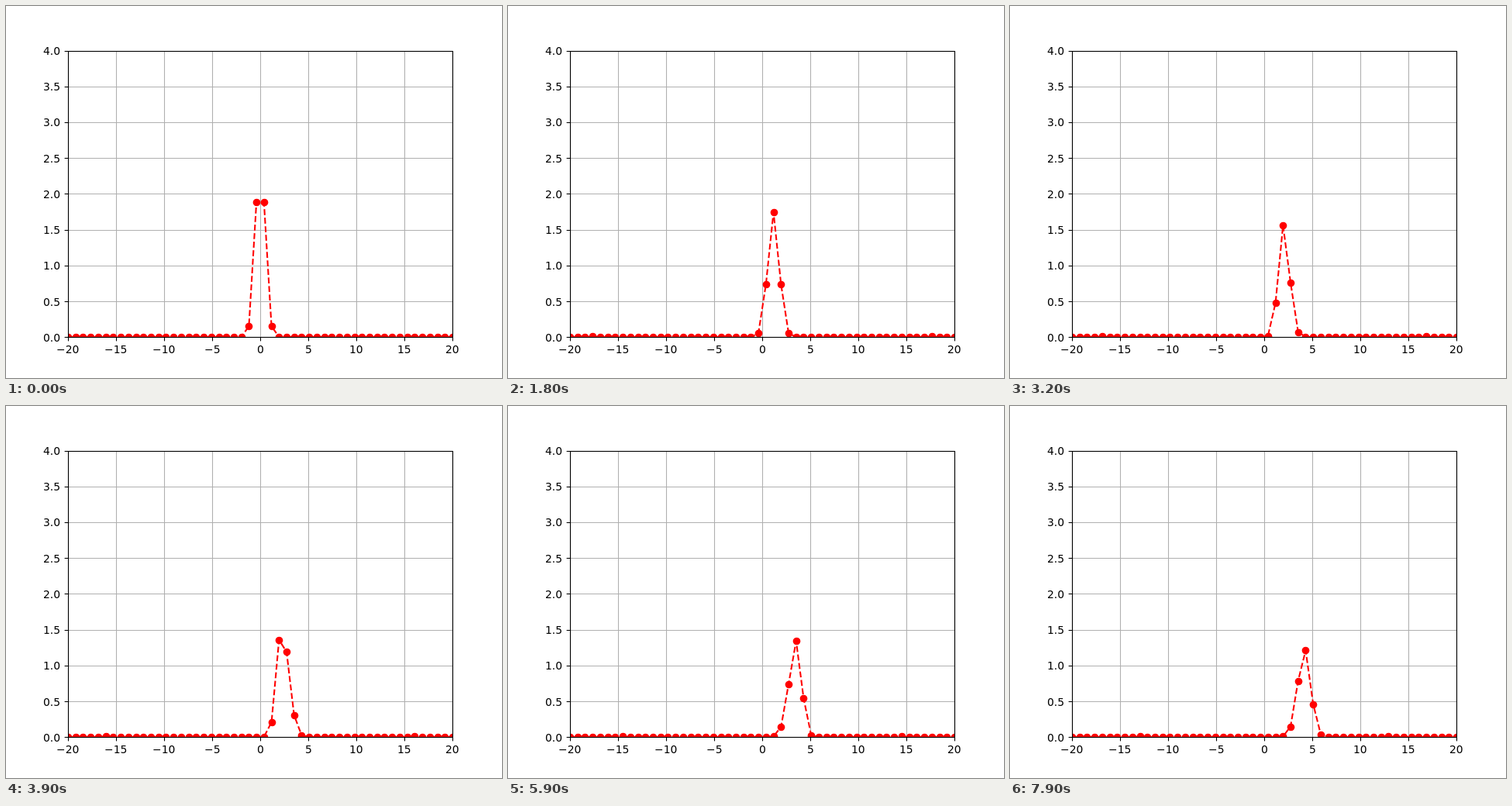
Animation of 640x480 px, one loop 8000 ms. Source, as an HTML page:

```html
<!DOCTYPE html>
<html lang="en">
<head>
<meta charset="utf-8">
<title>Moving pulse</title>
<style>
  html, body { margin: 0; width: 100%; height: 100%; overflow: hidden; background: #fff; }
  svg { display: block; }
  text { font: 13.89px "DejaVu Sans", sans-serif; }
  .grid { stroke: #b0b0b0; stroke-width: 1.11; }
  .tick { stroke: #000; stroke-width: 1.11; }
  .frame { fill: none; stroke: #000; stroke-width: 1.11; }
  #wave { fill: none; stroke: #f00; stroke-width: 2.08; stroke-dasharray: 7.71 3.33; stroke-linejoin: round; }
  circle { fill: #f00; }
</style>
</head>
<body>
<svg width="640" height="480" viewBox="0 0 640 480">
  <clipPath id="area"><rect x="80" y="58" width="496" height="369.5"/></clipPath>
  <g id="axes"></g>
  <g id="plot" clip-path="url(#area)"><polyline id="wave"/></g>
  <rect class="frame" x="80.5" y="58.5" width="496" height="369"/>
</svg>
<script>
const LOOP = 8000, STEP = 100, COUNT = 52;
const LEFT = 80, WIDTH = 496, BASE = 427.2, UNIT = 92.4;

const axes = document.getElementById('axes');
const plot = document.getElementById('plot');
const wave = document.getElementById('wave');
const snap = v => Math.floor(v + 0.5);

function add(parent, tag, attrs) {
  const el = document.createElementNS('http://www.w3.org/2000/svg', tag);
  for (const key in attrs) el.setAttribute(key, attrs[key]);
  return parent.appendChild(el);
}

const line = (cls, x1, y1, x2, y2) => add(axes, 'line', { class: cls, x1, y1, x2, y2 });

// Places text on whole pixels; align is the share of its width left of x
function label(text, x, y, align) {
  const el = add(axes, 'text', { y: snap(y) });
  el.textContent = text;
  el.setAttribute('x', snap(x - el.getComputedTextLength() * align));
}

for (let i = 0; i <= 8; i++) {
  const x = LEFT + 62 * i, px = x + 0.5;
  const y = BASE - 46.2 * i, py = snap(y) + 0.5;
  line('grid', px, 58, px, BASE);
  line('grid', LEFT, py, LEFT + WIDTH, py);
  line('tick', px, 427.5, px, 432.4);
  line('tick', 75.6, py, 80.5, py);
  label(String(i * 5 - 20).replace('-', '\u2212'), x, 448, 0.5);
  label((i / 2).toFixed(1), 70.28, y + 5.5, 1);
}

// Key points of the pulse: step, centre, height, steepness of left and right flank
const keys = [
  [0, 0, 2.58, 2.05, 2.05],
  [18, 1.175, 1.745, 1.4, 1.4],
  [26, 1.82, 1.59, 1.65, 1.65],
  [39, 2.223, 1.54, 1.83, 0.95],
  [44, 2.72, 1.83, 1.2, 1.3],
  [51, 3.32, 1.135, 0.636, 1.745],
  [67, 3.845, 1.555, 1.07, 1.68],
  [79, 4.2, 1.23, 1, 1.22]
];

function pulseAt(step) {
  const n = Math.max(1, keys.findIndex(k => k[0] >= step));
  const a = keys[n - 1], b = keys[n];
  const p = (step - a[0]) / (b[0] - a[0]);
  return a.map((v, i) => v + (b[i] - v) * p);
}

function heights(step) {
  const [, centre, top, left, right] = pulseAt(step);
  const h = Array.from({ length: COUNT }, (_, i) => {
    const d = 40 * i / (COUNT - 1) - 20 - centre;
    return top * Math.exp(-(d < 0 ? left : right) * d * d);
  });
  // A faint mirrored ripple drifts inwards from both ends
  const edge = Math.floor(1 + step / 9);
  if (step > 0) h[edge] = h[COUNT - 1 - edge] = 0.011;
  return h;
}

const xs = Array.from({ length: COUNT }, (_, i) => LEFT + WIDTH * i / (COUNT - 1));
const dots = xs.map(x => add(plot, 'circle', { cx: snap(x) + 0.5, r: 4.86 }));
let shown = -1;

function draw() {
  const step = Math.floor(performance.now() % LOOP / STEP);
  if (step !== shown) {
    shown = step;
    const ys = heights(step).map(h => BASE - h * UNIT);
    wave.setAttribute('points', xs.map((x, i) => x.toFixed(2) + ',' + ys[i].toFixed(2)).join(' '));
    dots.forEach((dot, i) => dot.setAttribute('cy', snap(ys[i]) + 0.5));
  }
  requestAnimationFrame(draw);
}
draw();
</script>
</body>
</html>
```
